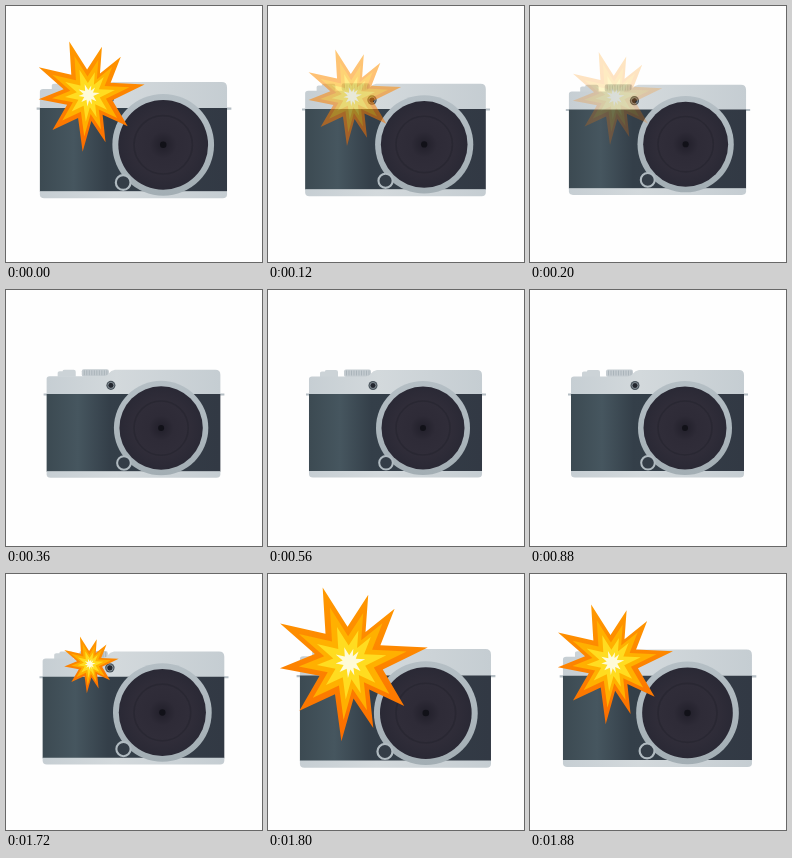
Write an HTML page that moves like this. It is 256x256 px and loops after 1.92 s.

```html
<!DOCTYPE html>
<html lang="en">
<head>
<meta charset="utf-8">
<title>Camera flash</title>
<style>
html, body { margin: 0; width: 100%; height: 100%; overflow: hidden; background: #fefefe; }
svg { display: block; width: 100%; height: 100%; }
</style>
</head>
<body>
<svg viewBox="0 0 256 256">
  <defs>
    <linearGradient id="leather">
      <stop offset="0" stop-color="#3c4a52"/>
      <stop offset=".18" stop-color="#46565f"/>
      <stop offset=".36" stop-color="#343f49"/>
      <stop offset="1" stop-color="#323944"/>
    </linearGradient>
    <linearGradient id="silver">
      <stop offset="0" stop-color="#c6ced3"/>
      <stop offset=".4" stop-color="#d3d9dc"/>
      <stop offset="1" stop-color="#c5cdd2"/>
    </linearGradient>
    <linearGradient id="rim" x2="0" y2="1">
      <stop offset="0" stop-color="#b5bfc5"/>
      <stop offset="1" stop-color="#a3aeb4"/>
    </linearGradient>
    <radialGradient id="glass">
      <stop offset="0" stop-color="#211f2a"/>
      <stop offset=".3" stop-color="#2e2b37"/>
      <stop offset=".65" stop-color="#302d39"/>
      <stop offset="1" stop-color="#2a2935"/>
    </radialGradient>
    <linearGradient id="fire" x2="0" y2="1">
      <stop offset="0" stop-color="#ff9a00"/>
      <stop offset="1" stop-color="#fb6c00"/>
    </linearGradient>
  </defs>
  <g id="camera">
    <path d="M52 87V83Q52 81.500 54 81.500H57V81Q57 80 59 80H68Q70 80 70 82V87Z" fill="#ccd3d7"/>
    <rect x="76" y="79.500" width="27" height="7.500" rx="2" fill="#c4cbd0"/>
    <path d="M78 83H102" stroke="#aab4ba" stroke-width="5" stroke-dasharray="1 1.500"/>
    <path d="M38 103.500H218V105.500H38Z" fill="#b5bec4"/>
    <path d="M41 105V89Q41 86.500 44 86.500H97Q101 86.500 103 83.500T109 80H209Q214 80 214 85V105Z" fill="url(#silver)"/>
    <path d="M41 104H214V181.500H41Z" fill="url(#leather)"/>
    <path d="M41 181H214V184Q214 187.500 210 187.500H45Q41 187.500 41 184Z" fill="url(#silver)"/>
    <circle cx="105" cy="95.500" r="4.500" fill="#4a545c"/>
    <circle cx="105" cy="95.500" r="3" fill="#22262e" stroke="#9aa5ac" stroke-width=".8"/>
    <circle cx="155" cy="138" r="47" fill="url(#rim)"/>
    <circle cx="155" cy="138" r="41.500" fill="url(#glass)"/>
    <circle cx="155" cy="138" r="27" fill="none" stroke="#22222c" stroke-width="1.500" opacity=".5"/>
    <circle cx="155" cy="138" r="3" fill="#111118"/>
    <circle cx="118" cy="172.800" r="6.800" fill="#343d47" stroke="#b0bac0" stroke-width="2"/>
  </g>
  <g id="flash"></g>
</svg>
<script>
const LOOP = 1920, STEP = 40, FIRE = 1680, RISE = 80;
const TIPS = 10, DEG = Math.PI / 180;
const camera = document.getElementById('camera');
const flash = document.getElementById('flash');
const clamp = v => Math.min(1, Math.max(0, v));

// Uneven spikes: both the angle and the length waver around the ring.
function tip(i) {
  i %= TIPS;
  const skew = 5 * (Math.cos((72 * i + 33) * DEG) + Math.sin(108 * i * DEG));
  const angle = (36 * i - 114 + skew) * DEG;
  const r = 57 + 5 * Math.cos(120 * i * DEG);
  return [r * Math.cos(angle), r * Math.sin(angle)];
}

function burst(size, fill) {
  const points = [];
  for (let i = 0; i < TIPS; i++) {
    const [x, y] = tip(i), [u, v] = tip(i + 1);
    points.push([x, y], [(x + u) / 4, (y + v) / 4]);
  }
  return `<polygon points="${points.join(' ')}" transform="scale(${size})" fill="${fill}"/>`;
}

flash.innerHTML = burst(1, 'url(#fire)') + burst(.73, '#ffb000') +
  burst(.47, '#ffdc20') + burst(.2, '#fffbd8');

function draw(ms) {
  const now = Math.floor(ms / STEP) * STEP;
  const age = (now + LOOP - FIRE) % LOOP;
  const rise = clamp(age / RISE);
  const zoom = 1 + .105 * rise * Math.exp(-(((age - 100) / 280) ** 2));
  const spread = rise ** 2 * (.75 + .78 * Math.exp((RISE - age) / 105));
  const place = (x, y) => `${128 + (x - 128) * zoom} ${128 + (y - 128) * zoom}`;
  camera.setAttribute('transform', `translate(${place(0, 0)}) scale(${zoom})`);
  flash.setAttribute('transform', `translate(${place(86, 92)}) scale(${spread})`);
  flash.setAttribute('opacity', clamp(1 - (age - 240) / 260));
}

const start = performance.now();
function tick() {
  draw(performance.now() - start);
  requestAnimationFrame(tick);
}
draw(0);
requestAnimationFrame(tick);
</script>
</body>
</html>
```
